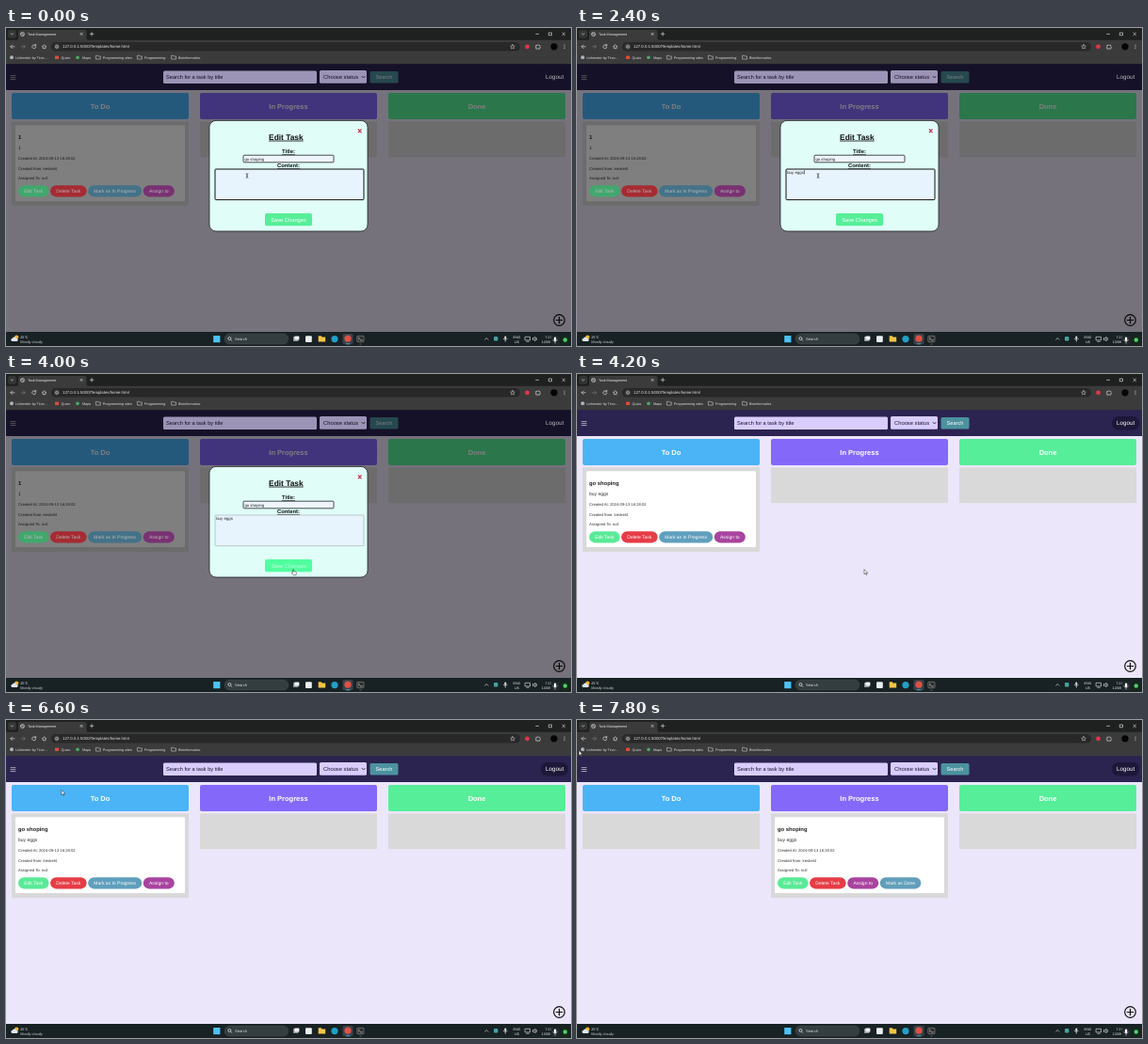
An HTML page for the animation above (8000 ms loop, 600 by 338 pixels).

```html
<!DOCTYPE html>
<html lang="en">
<head>
<meta charset="utf-8">
<title>Task Management</title>
<style>
html, body { margin: 0; width: 100%; height: 100%; overflow: hidden; background: #ebe6fa; }
svg { display: block; width: 600px; height: 338px; font-family: "Liberation Sans", Arial, sans-serif; text-rendering: geometricPrecision; }
.line { fill: none; stroke: #d5d5d5; stroke-width: .7; stroke-linecap: round; stroke-linejoin: round; }
.under { text-decoration: underline; }
.dim { filter: brightness(.72); }
</style>
</head>
<body>
<svg id="stage" viewBox="0 0 600 338"></svg>
<script>
const rect = (x, y, w, h, fill, rx = 0, more = '') =>
  `<rect x="${x}" y="${y}" width="${w}" height="${h}" rx="${rx}" fill="${fill}" ${more}/>`;
const text = (x, y, size, str, fill = '#fff', more = '') =>
  `<text x="${x}" y="${y}" font-size="${size}" fill="${fill}" ${more}>${str}</text>`;
const dot = (x, y, r, fill, more = '') => `<circle cx="${x}" cy="${y}" r="${r}" fill="${fill}" ${more}/>`;
const line = (d, more = '') => `<path class="line" d="${d}" ${more}/>`;
const group = (id, body, more = '') => `<g id="${id}" ${more}>${body}</g>`;
const MID = 'text-anchor="middle"';
const BOLD = 'font-weight="bold"';
const HEAVY = `${MID} ${BOLD}`;

const EDIT = ['Edit Task', 32.5, '#5aea97'];
const REMOVE = ['Delete Task', 38.5, '#e63c46'];
const ASSIGN = ['Assign to', 33, '#a8449f'];
const MARK = ['Mark as In Progress', 57, '#5f9fbd'];
const DONE = ['Mark as Done', 43.5, '#629fbb'];

function pills(x, list) {
  return list.map(([label, w, fill]) => {
    const id = label === MARK[0] ? 'id="mark"' : '';
    const out = rect(x, 167.2, w, 12.2, fill, 6.1, id) + text(x + w / 2, 175.1, 5, label, '#fff', MID);
    x += w + 1.6;
    return out;
  }).join('');
}

function card(id, x, title, body) {
  return group(id,
    rect(x, 99.5, 188, 89.5, '#d9d9d9', 1) +
    rect(x + 4, 103.2, 180, 80.8, '#fff', 1, 'class="face"') +
    text(x + 7, 117.6, 5.85, title, '#222', BOLD) +
    text(x + 7, 129.2, 5, body, '#333') +
    text(x + 7, 140, 4.17, 'Created At: 2024-09-13 16:28:02', '#333') +
    text(x + 7, 150.6, 4.17, 'Created from: kestrel4', '#333') +
    text(x + 7, 161.2, 4.17, 'Assigned To: null', '#333'));
}

function column(x, label, fill) {
  return rect(x, 69, 188, 28, fill, 2) +
    text(x + 94, 85.7, 7.5, label, '#fff', HEAVY) +
    rect(x, 99.5, 188, 37.7, '#d9d9d9', 1);
}

const page =
  rect(0, 66, 600, 258, '#ebe6fa') +
  rect(0, 38, 600, 28, '#2b2350') +
  line('M5 50.6h5M5 52.6h5M5 54.6h5', 'stroke="#fff"') +
  column(6, 'To Do', '#4ab4f7') +
  column(206, 'In Progress', '#8468fa') +
  column(406, 'Done', '#56ee98') +
  card('draft', 6, '1', '1') +
  card('todo', 6, 'go shoping', 'buy eggs') +
  card('progress', 206, 'go shoping', 'buy eggs') +
  rect(386.5, 46, 30, 12.6, '#4c929f', 1.5) +
  text(401.5, 54.2, 5.62, 'Search', '#fff', MID);

// Parts of the page that stay brighter under the backdrop
const lit =
  rect(167, 45.5, 163, 13.5, '#d9cdfd', 1.5) +
  text(170, 54.2, 5.65, 'Search for a task by title', '#1b1730') +
  rect(333, 45, 50, 13.8, '#d9cdfd', 1.5) +
  text(337, 54, 5.8, 'Choose status', '#1b1730') +
  line('M378 51.3l1.6 1.7l1.6-1.7', 'style="stroke:#111"') +
  rect(568, 45, 29, 14.5, '#1d1838', 7) +
  text(582.6, 54.4, 6.25, 'Logout', '#fff', MID) +
  group('todoPills', pills(13, [EDIT, REMOVE, MARK, ASSIGN])) +
  group('progressPills', pills(213, [EDIT, REMOVE, ASSIGN, DONE]));

const modal =
  rect(216, 98.4, 168, 117.6, '#e0fdf8', 7, 'stroke="#111" stroke-width=".7"') +
  line('M374.2 107.8l3 3M377.2 107.8l-3 3', 'style="stroke:#b8122c;stroke-width:1.1"') +
  text(297.4, 118.6, 8.4, 'Edit Task', '#111', HEAVY + ' class="under"') +
  text(300, 133.3, 5.85, 'Title:', '#111', HEAVY + ' class="under"') +
  rect(252, 135.2, 96, 7.6, '#eef5fc', 1, 'stroke="#222" stroke-width=".8"') +
  text(253.4, 140.6, 4.25, 'go shoping', '#222') +
  text(300, 148.2, 5.85, 'Content:', '#111', HEAVY + ' class="under"') +
  rect(222, 150, 158, 32.6, '#e8f4fd', .8, 'id="area"') +
  text(223.2, 154.8, 4.35, '', '#222', 'id="typed"') +
  rect(0, 151, .5, 4.6, '#111', 0, 'id="caret"') +
  rect(275, 197, 50, 13.2, '#56ee98', 1.8, 'id="save"') +
  text(300, 205.5, 5.75, 'Save Changes', '#fff', MID + ' id="saveText"');

const folder = (x, y, s, fill) =>
  `<path transform="translate(${x} ${y}) scale(${s})" d="M0 0h2l.6.8h2.4v3.4h-5z" ${fill}/>`;
const hollow = 'class="line" style="stroke-width:.6"';
const mark = (x, str) => text(x, 32.6, 3.72, str, '#e0e0e0');

const chrome =
  rect(0, 0, 600, 14, '#1f2020') +
  rect(0, 12.8, 600, 25.4, '#3b3b3b') +
  rect(2, 2, 9, 8.8, '#343535', 2.5) +
  line('M5.2 5.8l1.3 1.2l1.3-1.2') +
  `<path d="M11 13q2 0 2-2V4.5q0-2.5 2.5-2.5H83q2.5 0 2.5 2.5V11q0 2 2 2z" fill="#3b3b3b"/>` +
  dot(17.5, 6.6, 2, 'none', 'stroke="#ddd" stroke-width=".7"') + line('M15.8 6h2l.6 1.6') +
  text(23, 7.9, 3.7, 'Task Management', '#eee') +
  line('M79 5.3l2.2 2.2M81.2 5.3l-2.2 2.2M89.3 6.3h3.6M91.1 4.5v3.6') +
  line('M562.7 6.4h2.8M576.7 5h2.8v2.8h-2.8zM590.8 5l2.8 2.8M593.6 5l-2.8 2.8') +
  line('M9 19.8H5M6.7 18l-1.8 1.8l1.8 1.8') +
  line('M16.3 19.8h4M18.6 18l1.8 1.8l-1.8 1.8', 'style="stroke:#777"') +
  dot(29.7, 19.8, 4.6, '#555', 'id="hover"') +
  line('M31.4 18.6A2 2 0 1 0 31.7 20.3M31.7 17.3v1.6h-1.6') +
  line('M38.6 19.6l2-1.8l2 1.8M39.2 19.3v2.4h2.8v-2.4') +
  rect(48, 15, 498, 9.6, '#282828', 4.8) +
  dot(54, 19.8, 3.2, '#3b3b3b') + dot(54, 19.8, 1.6, 'none', 'stroke="#ccc" stroke-width=".6"') +
  line('M54 19.6v.8') +
  text(60, 21.3, 4.3, '127.0.0.1:5000/Templates/home.html', '#e8e8e8') +
  line('M538 17.5l.7 1.6l1.7.1l-1.3 1.1l.4 1.7l-1.5-.9l-1.5.9l.4-1.7l-1.3-1.1l1.7-.1z', 'style="stroke-width:.5"') +
  dot(553.5, 19.8, 2.4, '#e0354b') +
  line('M563.2 18.4h1.1q.7-1.5 1.4 0h1.2v1.2q1.3.6 0 1.3v1.2h-3.7z') +
  dot(582, 19.8, 3.6, '#050505') +
  [18.1, 19.8, 21.5].map(y => dot(593, y, .5, '#ddd')).join('') +
  dot(6, 31.3, 2, '#a9b4bd') + mark(10.3, 'Linkmeter by Tirvo...') +
  rect(52, 29.6, 4, 3.4, '#dd4b3e') + mark(58.5, 'Quvio') +
  dot(76, 31.3, 1.9, '#4aa564') + mark(81, 'Maps') +
  folder(95.8, 29.3, .9, hollow) + mark(102.8, 'Programming sites') +
  folder(139.8, 29.3, .9, hollow) + mark(147, 'Programming') +
  folder(176, 29.3, .9, hollow) + mark(183, 'Bioinformatics');

const taskbar =
  rect(0, 323, 600, 15, '#182124') +
  dot(11.2, 328.6, 2.2, '#f2b632') +
  `<path d="M6.5 333a1.7 1.7 0 0 1 .3-3.3a2.4 2.4 0 0 1 4.4.4a1.5 1.5 0 0 1 .5 2.9z" fill="#dfe8f0"/>` +
  text(15.3, 329.5, 3.7, '25°C', '#f0f0f0') +
  text(15.3, 334.5, 3.9, 'Mostly cloudy', '#d0d0d0') +
  rect(220.2, 327, 7.2, 7.2, '#4cc2f4') +
  rect(232, 325, 68, 11, '#343d40', 5.5, 'stroke="#4a5255" stroke-width=".4"') +
  dot(237.4, 330, 1.5, 'none', 'stroke="#eee" stroke-width=".7"') + line('M238.6 331.2l1.3 1.3') +
  text(243, 332, 4.1, 'Search', '#ddd') +
  rect(305, 328, 5.4, 5, '#8c9496', .5) + rect(306.4, 327.4, 5, 4.2, '#f0f0f0', .5) +
  rect(318, 327.3, 6.8, 6.8, '#e9eff2', 1) +
  folder(331.7, 327.2, 1.5, 'fill="#f3c545"') +
  dot(349, 330.6, 3.6, '#229fc4') +
  rect(357.5, 325, 11, 11, '#38434a', 1.5) +
  dot(363, 330.2, 3.6, '#dd5145') + rect(360.6, 335.5, 5, .8, '#63c6f2', .4) +
  rect(372.8, 327.3, 7.2, 6.4, '#2d2d2d', .8, 'stroke="#aaa" stroke-width=".5"') +
  line('M374.3 329l1.3 1.2l-1.3 1.2M376.4 331.8h1.8') + rect(375.4, 335.7, 2.2, .6, '#aaa', .3) +
  line('M508.6 331.2l1.7-1.7l1.7 1.7') +
  rect(518, 328, 4.4, 4.4, '#46a3a0', 1) +
  rect(529.3, 327.5, 2, 3.6, '#ddd', 1) + line('M528.3 330.3q2 3 4 0M530.3 331.9v1.4') +
  text(542.5, 329.6, 3.7, 'ENG', '#eee', MID) + text(542.5, 334.6, 3.7, 'US', '#eee', MID) +
  line('M551.5 328.3h5v3.6h-5zM552.8 333.3h2.4') +
  line('M559.7 329.6h1l1.4-1.3v4.4l-1.4-1.3h-1zM563.3 329.3q1 1.2 0 2.4') +
  text(572.5, 329.6, 3.7, '7:28', '#eee') + text(568.7, 334.6, 3.7, '13/09', '#eee') +
  rect(578.5, 327, 9.5, 10, '#20282b', 1) +
  rect(581.9, 328.5, 2.4, 4.4, '#fff', 1.2) + line('M580.8 331.8q2.3 3 4.6 0M583.1 333.6v1.5') +
  rect(589.3, 327, 9, 10, '#15291c', 1) + dot(593.8, 331.5, 2.2, '#4fd06b');

const plus = dot(587.5, 310.5, 5.8, 'none', 'stroke="#111" stroke-width="1.2"') +
  line('M584.3 310.5h6.4M587.5 307.3v6.4', 'style="stroke:#111;stroke-width:1.2"');

const INK = 'stroke="#111" stroke-width=".45" stroke-linejoin="round"';
const pointer = group('pointer',
  `<path id="arrow" d="M0 0v5.2l1.2-1.1l.8 1.8l.9-.4l-.8-1.7h1.7z" fill="#fff" ${INK}/>` +
  `<path id="hand" d="M-.5 0q.5-.6 1 0v2.1l2.2.5q.8.3.7 1.1l-.5 2.3h-2.9l-1.6-2.2q-.3-.8.5-.6l.6.5z" fill="#fff" ${INK}/>` +
  line('M-1-2.3q1 0 1 .7v3.2q0 .7-1 .7M1-2.3q-1 0-1 .7v3.2q0 .7 1 .7', 'id="beam" style="stroke:#111;stroke-width:.5"'));

const stage = document.getElementById('stage');
stage.innerHTML = page + plus +
  rect(0, 38, 600, 286, '#000', 0, 'id="shade" opacity=".5"') +
  group('lit', lit) + group('modal', modal) + chrome + taskbar + pointer;

const el = {};
stage.querySelectorAll('[id]').forEach(node => el[node.id] = node);
const face = el.todo.querySelector('.face');
const show = (id, on) => el[id].style.display = on ? '' : 'none';
const fill = (node, color) => node.setAttribute('fill', color);

const LOOP = 8000, TICK = 200;
const path = [
  [0, 256, 157], [2400, 256, 157], [3400, 305, 208], [4600, 305, 207.5],
  [5400, 30.8, 22], [6200, 30.8, 22], [7200, 110.8, 171], [7400, 110.8, 171],
  [7600, 46, 90], [7800, 2, 32.5], [8000, 2, 32.5]
];

function locate(t) {
  const i = path.findIndex((p, n) => n && t < p[0]);
  const [t0, x0, y0] = path[i - 1], [t1, x1, y1] = path[i];
  const u = (t - t0) / (t1 - t0), k = u * u * (3 - 2 * u);
  return [x0 + (x1 - x0) * k, y0 + (y1 - y0) * k];
}

function draw(t) {
  const open = t < 4200, moved = t >= 7600;
  const [x, y] = locate(t);
  const onSave = open && t >= 3400;
  const onCard = !open && !moved && x > 10 && x < 190 && y > 103 && y < 184;
  const onMark = onCard && y > 167 && x > 87 && x < 144;
  const focused = t < 3800;

  show('draft', open);
  show('todo', !open && !moved);
  show('todoPills', !moved);
  show('progress', moved);
  show('progressPills', moved);
  show('shade', open);
  show('modal', open);
  el.lit.classList.toggle('dim', open);

  const count = Math.max(0, Math.min(8, t / TICK - 2));
  el.typed.textContent = 'buy eggs'.slice(0, count);
  const blink = t >= 600 && t <= 2400 || t > 2400 && t % 1000 < 500;
  show('caret', focused && blink);
  // A trailing space has no width of its own at the end of the run
  const gap = count === 4 ? 1.2 : 0;
  el.caret.setAttribute('x', 223.4 + (open ? el.typed.getComputedTextLength() : 0) + gap);
  el.area.setAttribute('stroke', focused ? '#111' : '#8c949c');
  el.area.setAttribute('stroke-width', focused ? 1 : .5);
  fill(el.save, onSave ? '#50ff9f' : '#56ee98');
  fill(el.saveText, onSave ? '#c4ffdf' : '#fff');

  fill(face, onCard ? '#f8f8f8' : '#fff');
  fill(el.mark, onMark ? '#46b3ef' : MARK[2]);
  show('hover', t >= 5200 && t < 6400);
  fill(el.hover, t >= 6000 ? '#626262' : '#555');

  const hand = onSave || onMark;
  const beam = open && y < 183;
  show('hand', hand);
  show('beam', beam);
  show('arrow', !hand && !beam);
  el.pointer.setAttribute('transform', `translate(${x} ${y})`);
}

const start = performance.now();
function frame() {
  const t = (performance.now() - start) % LOOP;
  draw(Math.floor(t / TICK) * TICK);
  requestAnimationFrame(frame);
}
frame();
</script>
</body>
</html>
```
